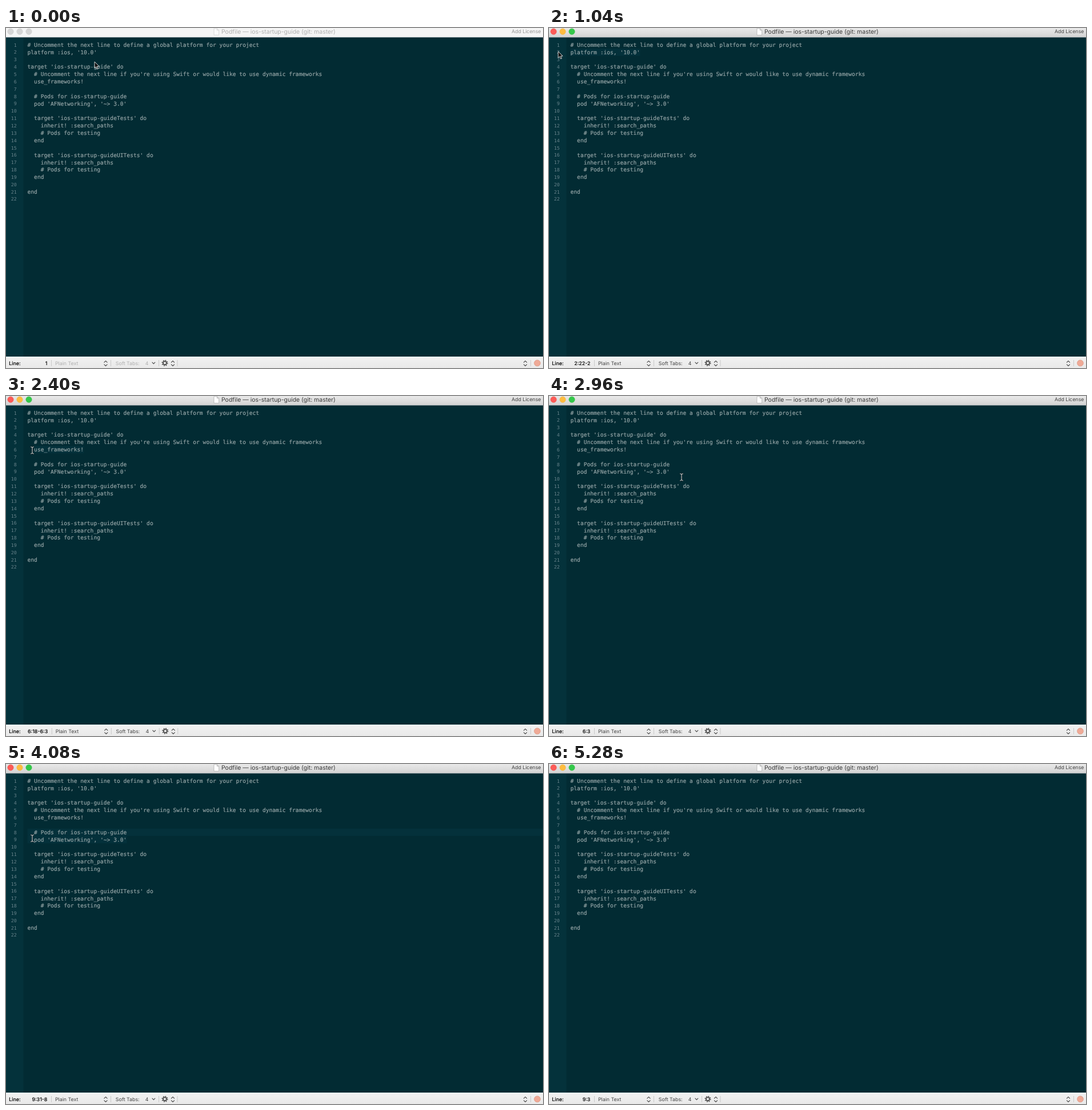
Recreate the animation shown at these times as an HTML page. Size 940 by 595 pixels, loop 5.36 s.

```html
<!DOCTYPE html>
<html lang="en">
<head>
<meta charset="utf-8">
<title>Editor</title>
<style>
  html, body { margin: 0; width: 100%; height: 100%; overflow: hidden; background: #022b33; }
  svg { display: block; width: 940px; height: 595px; }
  text { text-rendering: geometricPrecision; white-space: pre; }
  .code text { font: 9.643px "DejaVu Sans Mono", monospace; fill: #93a3a5; stroke: #93a3a5; stroke-width: .2; }
  .code .num { font-size: 8.3px; fill: #67828a; stroke: none; text-anchor: end; }
  .ui { font: 8.8px Inter, "Open Sans", sans-serif; fill: #424242; }
  .title { font-size: 10.46px; fill: #383838; }
  .strong { font-weight: 500; fill: #111; stroke: #111; stroke-width: .15; }
  .chev { fill: none; stroke: #444; stroke-width: 1.1; stroke-linecap: round; stroke-linejoin: round; }
  .rule { stroke: #c9c9c9; }
  .idle .ui:not(.strong) { fill: #b0b0b0; }
  .idle .light { fill: #d6d6d6; stroke: #c8c8c8; }
  .idle #titlebar { fill: #f5f5f5; }
  .idle #doc { opacity: .5; }
  .idle #add { fill: #969696; }
</style>
</head>
<body>
<svg id="stage" viewBox="0 0 940 595">
  <defs>
    <linearGradient id="bar" x2="0" y2="1">
      <stop stop-color="#e9e9e9"/><stop offset="1" stop-color="#d3d3d3"/>
    </linearGradient>
    <linearGradient id="foot" x2="0" y2="1">
      <stop stop-color="#f2f2f2"/><stop offset="1" stop-color="#e9e9e9"/>
    </linearGradient>
    <path id="updown" class="chev" d="M-2.6-1.8 0-4.4 2.6-1.8M-2.6 1.8 0 4.4 2.6 1.8"/>
    <path id="ibeam" d="M-2.4-6Q0-6 0-4.5Q0-6 2.4-6M0-4.5V4.5M-2.4 6Q0 6 0 4.5Q0 6 2.4 6"/>
  </defs>

  <rect width="940" height="595" fill="#022b33"/>
  <rect y="16" width="30.5" height="560" fill="#04323b"/>
  <g id="selection" fill="#04313b"></g>
  <g id="code" class="code"></g>
  <rect id="caret" width="1" height="12" fill="#8fa0a2"/>

  <rect id="titlebar" width="940" height="16" fill="url(#bar)"/>
  <path d="M0 16.3H940" stroke="#a9b1b2" stroke-width=".7"/>
  <g stroke-width=".5">
    <circle class="light" cx="8" cy="6.2" r="5.2" fill="#fc5b57" stroke="#ef524c"/>
    <circle class="light" cx="24" cy="6.2" r="5.2" fill="#fdbc40" stroke="#efb038"/>
    <circle class="light" cx="40" cy="6.2" r="5.2" fill="#34c84a" stroke="#2eba41"/>
  </g>
  <path id="doc" d="M364 .8h5.4l3.2 3.2v8.4H364zM369.4.8V4h3.2" fill="#fff" stroke="#a8a8a8" stroke-width=".7"/>
  <text class="ui title" x="377" y="10.4">Podfile — ios-startup-guide (git: master)</text>
  <text id="add" class="ui" x="936.5" y="9.2" text-anchor="end">Add License</text>

  <rect y="575" width="940" height="20" fill="url(#foot)"/>
  <text class="ui strong" x="5.3" y="589.6">Line:</text>
  <g id="shift">
    <text id="position" class="ui strong" x="72.4" y="589.6" text-anchor="end"></text>
    <path class="rule" d="M79.5 581v11M183.5 581v11M267.5 581v11M300 581v11"/>
    <text class="ui" x="86" y="589.6">Plain Text</text>
    <use href="#updown" x="174.5" y="587"/>
    <text class="ui" x="191.8" y="589.6">Soft Tabs:</text>
    <text class="ui" x="243.8" y="589.6">4</text>
    <path class="chev" d="M256 585.2l2.4 2.4 2.4-2.4"/>
    <g fill="none" stroke="#555">
      <circle cx="278" cy="586.3" r="3" stroke-width="1.9"/>
      <circle cx="278" cy="586.3" r="4.7" stroke-width="1.7" stroke-dasharray="1.7 1.99"/>
    </g>
    <use href="#updown" x="292" y="587"/>
  </g>
  <use href="#updown" x="909" y="587"/>
  <path class="rule" d="M918.5 581v11"/>
  <circle cx="930" cy="586.4" r="5.4" fill="#efaa97" stroke="#d99582" stroke-width=".7"/>

  <path id="arrow" d="M0 0V11.2L2.6 8.8 4.4 13 6.3 12.2 4.5 8.1H8.1Z" fill="#111" stroke="#e8eaea" stroke-width=".9"/>
  <g id="beam" fill="none" stroke-linecap="round">
    <use href="#ibeam" stroke="#0a1518" stroke-width="2"/>
    <use href="#ibeam" stroke="#e6eaea" stroke-width="1"/>
  </g>
</svg>
<script>
const LOOP = 5360, TICK = 80, LAG = 60;
const LEFT = 37.5, CHAR = 5.805, ROW = 12.85, TOP = 23.1;

const source = `# Uncomment the next line to define a global platform for your project
platform :ios, '10.0'

target 'ios-startup-guide' do
  # Uncomment the next line if you're using Swift or would like to use dynamic frameworks
  use_frameworks!

  # Pods for ios-startup-guide
  pod 'AFNetworking', '~> 3.0'

  target 'ios-startup-guideTests' do
    inherit! :search_paths
    # Pods for testing
  end

  target 'ios-startup-guideUITests' do
    inherit! :search_paths
    # Pods for testing
  end

end
`;

// Pointer path: time, x, y
const path = [
  [0, 155, 59], [160, 168, 50], [320, 165, 45], [480, 131, 46], [560, 124, 46],
  [880, 16, 41], [1300, 16, 41], [1840, 150, 95], [2000, 150, 95], [2360, 46, 95],
  [2480, 46, 95], [2960, 232, 142], [3080, 222, 134], [3400, 44, 120], [3960, 44, 121],
  [4080, 46, 130], [4240, 48, 133], [4720, 48, 133], [5160, 960, 610], [LOOP, 960, 610]
];

// Caret steps: time, row, column, then while dragging: head row, lowest column
const steps = [
  [0, 1, 1], [300, 2, 22], [360, 2, 22, 2, 1], [1120, 2, 1],
  [1880, 6, 18], [2000, 6, 18, 6, 3], [2440, 6, 3],
  [3100, 9, 31], [3160, 9, 31, 9, 3], [3440, 9, 31, 8, 1], [4240, 9, 31, 9, 3], [4720, 9, 3]
];

const $ = id => document.getElementById(id);
const colX = col => LEFT + (col - 1) * CHAR;
const rowY = row => TOP + (row - 1) * ROW;
const label = (row, col) => col === 1 ? `${row}` : `${row}:${col}`;
const show = (el, on) => el.setAttribute("visibility", on ? "visible" : "hidden");

function add(parent, tag, attrs, text = "") {
  const el = document.createElementNS("http://www.w3.org/2000/svg", tag);
  for (const key in attrs) el.setAttribute(key, attrs[key]);
  el.textContent = text;
  parent.append(el);
}

source.split("\n").forEach((line, i) => {
  const y = rowY(i + 1) + 9.8;
  add($("code"), "text", { class: "num", x: 18.7, y: y - 0.3 }, i + 1);
  add($("code"), "text", { x: LEFT, y }, line);
});

function pointer(t) {
  const i = Math.max(1, path.findIndex(p => p[0] >= t));
  const [t0, x0, y0] = path[i - 1], [t1, x1, y1] = path[i];
  const k = Math.max(0, (t - t0) / (t1 - t0));
  return [x0 + (x1 - x0) * k, y0 + (y1 - y0) * k];
}

function select(row, from, to) {
  add($("selection"), "rect", { x: from, y: rowY(row), width: Math.max(0, to - from), height: ROW });
}

function draw(t) {
  const idle = t < 240;
  $("stage").classList.toggle("idle", idle);

  const [x, y] = pointer(t);
  const isArrow = idle || x < 30 || y > 570;
  show($("arrow"), isArrow);
  show($("beam"), !isArrow);
  $(isArrow ? "arrow" : "beam").setAttribute("transform", `translate(${x} ${y})`);

  const [since, row, col, headRow, minCol] = steps.findLast(s => s[0] <= t);
  let text = label(row, col);
  $("selection").replaceChildren();
  if (headRow) {
    const under = Math.round((pointer(t - LAG)[0] - LEFT) / CHAR) + 1;
    const head = headRow === row ? Math.min(col, Math.max(minCol, under)) : minCol;
    if (headRow !== row) select(headRow, colX(head), 940);
    select(row, headRow === row ? colX(head) : LEFT, colX(col));
    if (headRow !== row || head !== col) text += "-" + label(headRow, head);
  }
  $("position").textContent = text;
  $("shift").setAttribute("transform", `translate(${text.length > 6 ? 0.8 : 0} 0)`);

  show($("caret"), !idle && !headRow && (t - since) % 1000 < 500);
  $("caret").setAttribute("x", colX(col));
  $("caret").setAttribute("y", rowY(row) + 0.4);
}

const start = performance.now();
function frame() {
  const t = (performance.now() - start) % LOOP;
  draw(Math.floor(t / TICK) * TICK);
  requestAnimationFrame(frame);
}
frame();
</script>
</body>
</html>
```
